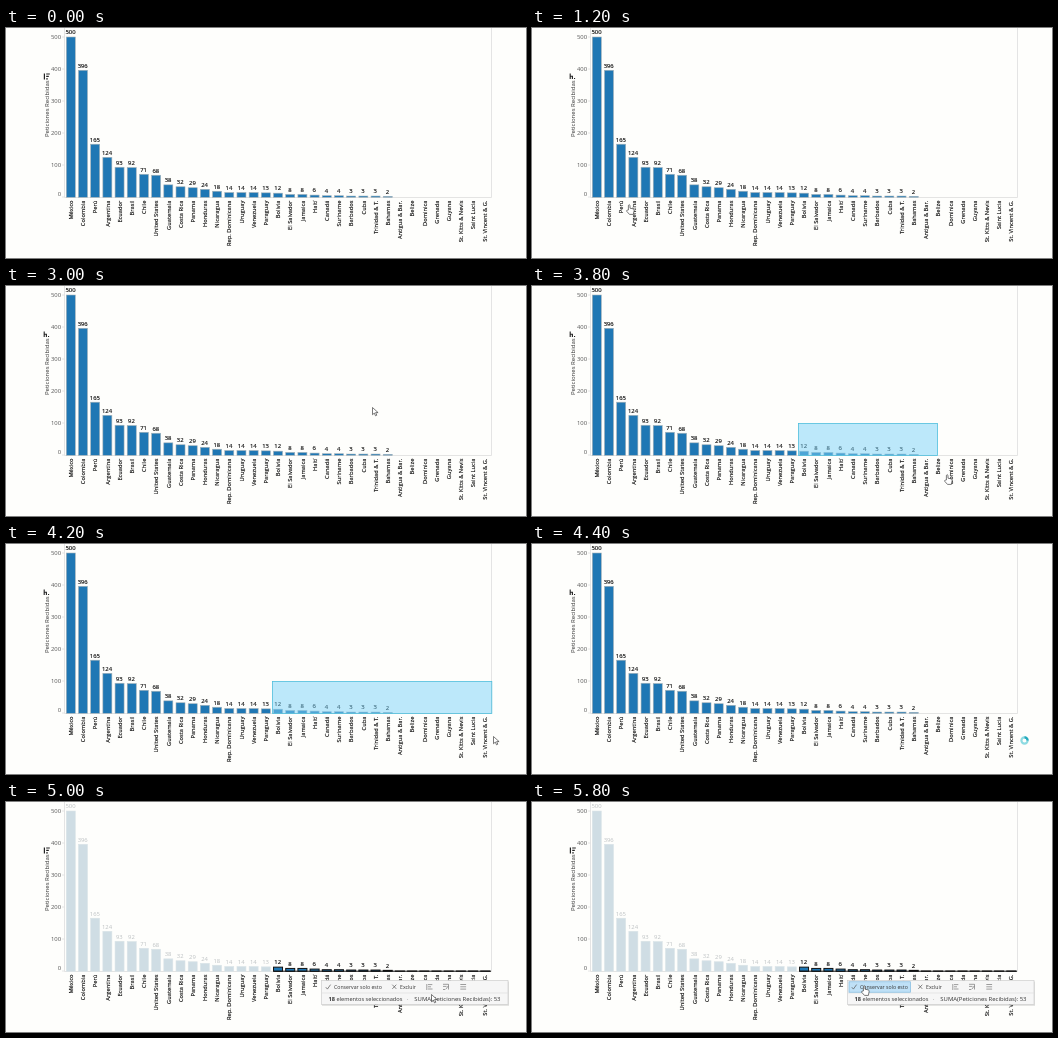
An HTML page for the animation above (8 s loop, 520 by 230 pixels).

```html
<!DOCTYPE html>
<html lang="es">
<head>
<meta charset="utf-8">
<title>Peticiones Recibidas</title>
<style>
html, body { margin: 0; width: 100%; height: 100%; overflow: hidden; background: #fefefc; }
svg { display: block; width: 520px; height: 230px; font-family: "Open Sans", "Noto Sans", sans-serif; }
.bar { fill: #1f77b4; stroke: #a3b1b8; stroke-width: .6; }
.value { font-size: 5.9px; fill: #111; stroke: #111; stroke-width: .15; text-anchor: middle; }
.name { font-size: 5.75px; fill: #111; stroke: #111; stroke-width: .15; text-anchor: end; }
.tick { font-size: 5.9px; fill: #555; text-anchor: end; }
.title { font-size: 6px; fill: #333; }
.line { stroke: #dedede; stroke-width: .8; }
.dim .out.bar { fill: #cfdde4; stroke: #dbe4e8; }
.dim .out.value { fill: #bcc0c2; stroke: none; }
.dim .in.bar { stroke: #111; stroke-width: 1; }
.bar.zero { fill: none; stroke: none; }
#band { fill: #7dd4fa; fill-opacity: .5; stroke: #4fbfdc; stroke-width: .8; }
#tip { font-size: 5.65px; fill: #333; }
#tip .cmd { font-size: 5.2px; }
#tip .sum { font-size: 5.95px; text-anchor: end; }
#hover { fill: #bfe0f6; stroke: #7fb9e0; stroke-width: .7; }
.thin { fill: none; stroke: #555; stroke-width: .7; }
.icon { fill: none; stroke: #222; }
.pointer { fill: #fff; stroke: #333; stroke-width: .65; stroke-linejoin: round; }
</style>
</head>
<body>
<svg id="stage" viewBox="0 0 520 230">
  <g id="chart"></g>
  <text class="title" transform="translate(43 109) rotate(-90)">Peticiones Recibidas</text>
  <path id="sortOn" class="icon" stroke-width="1.2" d="M38.4 45.5v6M40.2 46h3.6M40.2 48.4h2.6M40.2 50.8h1.6"/>
  <path id="sortOff" class="icon" stroke-width="1.1" d="M38.2 45.6v5.4M38.2 48.2h2.2v2.8M42 50.5h1.1"/>
  <rect id="band" x="266.4" y="137.4" height="32"/>
  <g id="tip">
    <rect x="316" y="179.5" width="187" height="24.3" fill="#000" opacity=".13"/>
    <rect x="315.4" y="178.4" width="186.6" height="24" fill="#f6f6f6" stroke="#cfcfcf" stroke-width=".7"/>
    <path d="M316 191h186" stroke="#dedede" stroke-width=".7"/>
    <rect id="hover" x="317" y="179.8" width="61.5" height="10.4"/>
    <path class="thin" d="M319.8 185.2l1.6 1.9 3.2-4.5M386.3 182.7l4 4.2m0-4.2l-4 4.2"/>
    <text class="cmd" x="328" y="187">Conservar solo esto</text>
    <text class="cmd" x="394" y="187">Excluir</text>
    <path class="thin" stroke-opacity=".8" d="M420.8 182v6M422 182.6h4.3M422 184.8h3M422 187h4.5M437 182.3h5.5v5.2M437 184.4h3.5M437 187.5h2.4M440 187l2.2-3M454.3 182.5h5.8M454.3 184.8h5.8M454.3 187.1h5.8"/>
    <text x="322.5" y="199"><tspan font-weight="700">18</tspan> elementos seleccionados</text>
    <text x="401" y="199" fill="#777">·</text>
    <text class="sum" x="494.5" y="199">SUMA(Peticiones Recibidas): 53</text>
  </g>
  <g id="cursor">
    <path id="arrow" class="pointer" d="M.5 .5v7.2l1.8-1.6 1.2 2.7 1.3-.6-1.2-2.6h2.5z"/>
    <path id="hand" class="pointer" d="M2.4 6V1.3q.8-1.3 1.6 0v2.9l3.3.7q1 .3 .8 1.6l-.7 3.9H3.5L.8 7.4q-.5-1.2.6-1.2z"/>
    <g id="ring" fill="none">
      <circle cx="4.5" cy="4.5" r="3.1" stroke="#8edbe2" stroke-width="2.2"/>
      <path d="M4.5 1.4a3.1 3.1 0 0 1 3.1 3.1" stroke="#25a9bd" stroke-width="2.2"/>
    </g>
  </g>
</svg>
<script>
const LOOP = 8000, LEFT = 64.9, PITCH = 12.19, BASE = 169, UNIT = 0.32, FIRST_IN = 17;
const names = ["México", "Colombia", "Perú", "Argentina", "Ecuador", "Brasil", "Chile",
  "United States", "Guatemala", "Costa Rica", "Panama", "Honduras", "Nicaragua",
  "Rep. Dominicana", "Uruguay", "Venezuela", "Paraguay", "Bolivia", "El Salvador",
  "Jamaica", "Haití", "Canadá", "Suriname", "Barbados", "Cuba", "Trinidad & T.",
  "Bahamas", "Antigua & Bar.", "Belize", "Dominica", "Grenada", "Guyana",
  "St. Kitts & Nevis", "Saint Lucia", "St. Vincent & G."];
const values = [500, 396, 165, 124, 93, 92, 71, 68, 38, 32, 29, 24, 18, 14, 14, 14, 13,
  12, 8, 8, 6, 4, 4, 3, 3, 3, 2];

// time, x, y, pointer, right edge of the selection band
const steps = [
  [0, 0, 0, ""],
  [1200, 94, 176, "hand"],
  [1400, 115, 175, "hand"],
  [1600, 125, 175, "hand"],
  [1800, 198, 156, "arrow"],
  [2000, 243, 153, "arrow"],
  [2200, 276, 153, "arrow"],
  [2400, 328, 161, "arrow"],
  [2600, 365, 165, "arrow"],
  [2800, 378, 165, "arrow"],
  [3000, 366, 121, "arrow"],
  [3200, 294, 117, "arrow"],
  [3400, 270, 133, "arrow"],
  [3600, 328, 170, "arrow", 320],
  [3800, 412, 188, "hand", 405.5],
  [4000, 469, 193, "hand", 466.5],
  [4200, 487, 192, "arrow", 485.8],
  [4400, 488, 192, "ring"],
  [4600, 479, 192, "ring"],
  [4800, 465, 190, "ring"],
  [5000, 425, 192, "arrow"],
  [5200, 370, 192, "arrow"],
  [5400, 352, 192, "arrow"],
  [5600, 331, 184, "arrow"],
  [5800, 329, 183, "hand"]
];

const $ = id => document.getElementById(id);
const show = (id, on) => $(id).setAttribute("visibility", on ? "inherit" : "hidden");

function add(tag, cls, attrs, text = "") {
  const el = document.createElementNS("http://www.w3.org/2000/svg", tag);
  el.setAttribute("class", cls);
  for (const key in attrs) el.setAttribute(key, attrs[key]);
  el.textContent = text;
  $("chart").append(el);
}

function buildChart() {
  add("path", "line", { d: `M58.5 0V${BASE}.5H485.5V0`, fill: "none" });
  for (let n = 0; n <= 500; n += 100) {
    const y = BASE - n * UNIT;
    add("path", "line", { d: `M56 ${y}h2.5` });
    add("text", "tick", { x: 55, y: y + (n ? 2.1 : -1) }, n);
  }
  names.forEach((name, i) => {
    const x = LEFT + i * PITCH, value = values[i] || 0, top = BASE - value * UNIT;
    const group = i < FIRST_IN ? "out" : "in";
    add("rect", `bar ${group}${value ? "" : " zero"}`,
      { x: x - 4.6, y: top, width: 9, height: Math.max(BASE + 0.3 - top, 0.3) });
    if (value) add("text", `value ${group}`, { x: x - 0.4, y: top - 2.7 }, value);
    add("text", "name", { transform: `translate(${x + 2.1} 172.6) rotate(-90)` }, name);
  });
  add("path", "in bar zero", { d: `M267.6 ${BASE}.2H485` });
}

function draw(now) {
  const t = now % LOOP;
  const [, x, y, kind, edge] = steps.filter(s => s[0] <= t).pop();
  const hovering = t < 1200 || t >= 5000;
  $("cursor").setAttribute("transform", `translate(${x} ${y})`);
  for (const id of ["arrow", "hand", "ring"]) show(id, id === kind);
  show("band", edge);
  if (edge) $("band").setAttribute("width", edge - 266.4);
  show("sortOn", hovering);
  show("sortOff", !hovering);
  show("tip", t >= 4800);
  show("hover", t >= 5600);
  $("stage").setAttribute("class", t >= 5000 ? "dim" : "");
  requestAnimationFrame(draw);
}

buildChart();
draw(performance.now());
</script>
</body>
</html>
```
